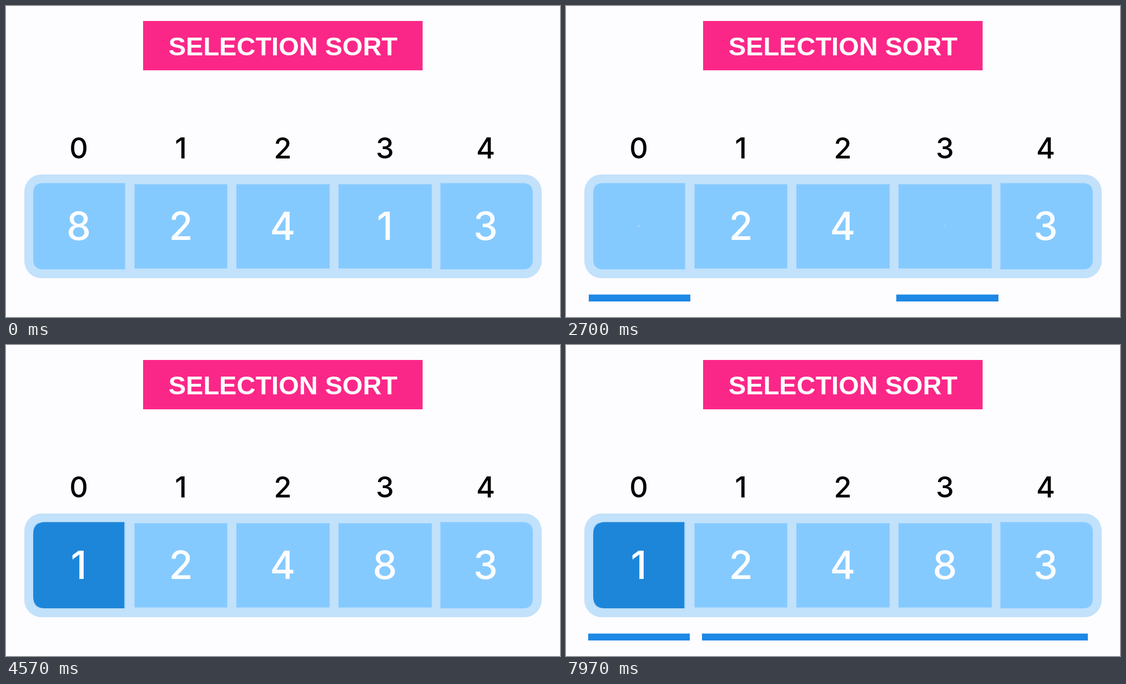
These frames come from a looping animation (998x561 px, 8 s). An HTML page:

```html
<!DOCTYPE html>
<html lang="en">
<head>
<meta charset="utf-8">
<title>Selection sort</title>
<style>
  html, body { margin: 0; width: 100%; height: 100%; overflow: hidden; background: #fdfcfe; }
  svg { display: block; width: 100%; height: 100%; }
  text { text-anchor: middle; }
  .label { font: bold 47px "Liberation Sans", Arial, sans-serif; }
  .index { font: 500 52px Inter, sans-serif; }
  .value { font: 500 70px Inter, sans-serif; fill: #fdfdff; }
</style>
</head>
<body>
<svg id="stage" viewBox="0 0 998 561">
  <rect x="247" y="27" width="503.5" height="89" fill="#fb2788"/>
  <text class="label" x="499" y="88.5" fill="#fff">SELECTION SORT</text>
  <rect x="33" y="304" width="932" height="187" rx="31" fill="#c2e1fb"/>
  <g fill="#85caff">
    <path d="M214.5 319.5H67Q49 319.5 49 337.5V457Q49 475 67 475H214.5Z"/>
    <path d="M231.5 321.5h167v152h-167zM415 321.5h168v152h-168zM599 321.5h168v152h-168z"/>
    <path d="M782.5 319.5H931Q949 319.5 949 337.5V457Q949 475 931 475H782.5Z"/>
  </g>
  <path id="sortedCell" fill="#1e86d9" d="M213 319.5H71Q49 319.5 49 341.5V453Q49 475 71 475H213Z"/>
</svg>
<script>
const LOOP = 8000;
const BLUE = '#1e88e5';
const SOFT_EDGE = 0.036;
const CENTERS = [131, 315, 498.5, 682.5, 864];
const BEFORE = [8, 2, 4, 1, 3];
const AFTER = [1, 2, 4, 8, 3];
const stage = document.getElementById('stage');
const sortedCell = document.getElementById('sortedCell');

function add(parent, tag, attributes, content = '') {
  const node = document.createElementNS('http://www.w3.org/2000/svg', tag);
  for (const name in attributes) node.setAttribute(name, attributes[name]);
  node.textContent = content;
  return parent.appendChild(node);
}

const progress = (t, start, end) => Math.min(1, Math.max(0, (t - start) / (end - start)));
const smooth = p => p * p * (3 - 2 * p);

const values = CENTERS.map((x, i) => {
  add(stage, 'text', { class: 'index', x, y: 274.5 }, i);
  return add(stage, 'text', { class: 'value', y: 25 }, BEFORE[i]);
});

// A bar that opens from its centre with soft ends.
function makeBar(id, x, width, start, end, hideStart = Infinity) {
  const gradient = add(stage, 'linearGradient', { id });
  const stops = [0, 1, 1, 0].map(opacity =>
    add(gradient, 'stop', { 'stop-color': BLUE, 'stop-opacity': opacity }));
  const rect = add(stage, 'rect', { x, y: 520.5, width, height: 12.5, fill: `url(#${id})` });
  return t => {
    const outer = progress(t, start, end) * (0.5 + SOFT_EDGE);
    const core = Math.max(0, outer - SOFT_EDGE);
    [-outer, -core, core, outer].forEach((d, i) => stops[i].setAttribute('offset', 0.5 + d));
    const fade = hideStart < LOOP ? progress(t, hideStart, hideStart + 300) : 0;
    rect.setAttribute('opacity', outer > 0 ? 1 - fade : 0);
  };
}

const bars = [
  makeBar('minimum', 595, 184, 450, 1050, 3020),
  makeBar('first', 40.5, 184, 1400, 2000, 3020),
  makeBar('sorted', 39.5, 184, 5250, 6030),
  makeBar('unsorted', 245, 695.5, 5250, 6030),
];

const captions = [['SORTED', 131.5], ['UNSORTED', 572]].map(([word, x]) =>
  add(stage, 'text', { class: 'label', x, fill: BLUE }, word));

function draw(now) {
  const t = now % LOOP;
  const swapped = t >= 2780;
  const swapScale = swapped ? smooth(progress(t, 2780, 3260)) : 1 - smooth(progress(t, 2200, 2780));
  values.forEach((node, i) => {
    const moves = BEFORE[i] !== AFTER[i];
    node.textContent = (swapped ? AFTER : BEFORE)[i];
    node.setAttribute('transform', `translate(${CENTERS[i]} 397) scale(${moves ? swapScale : 1})`);
  });
  sortedCell.setAttribute('opacity', smooth(progress(t, 3280, 3560)));
  bars.forEach(update => update(t));

  // Captions fade in while sliding below the stage.
  const drop = progress(t, 5250, 6030);
  captions.forEach(node => {
    node.setAttribute('y', 551 + 78 * drop);
    node.setAttribute('opacity', drop ** 1.45);
  });
  requestAnimationFrame(draw);
}
requestAnimationFrame(draw);
</script>
</body>
</html>
```
